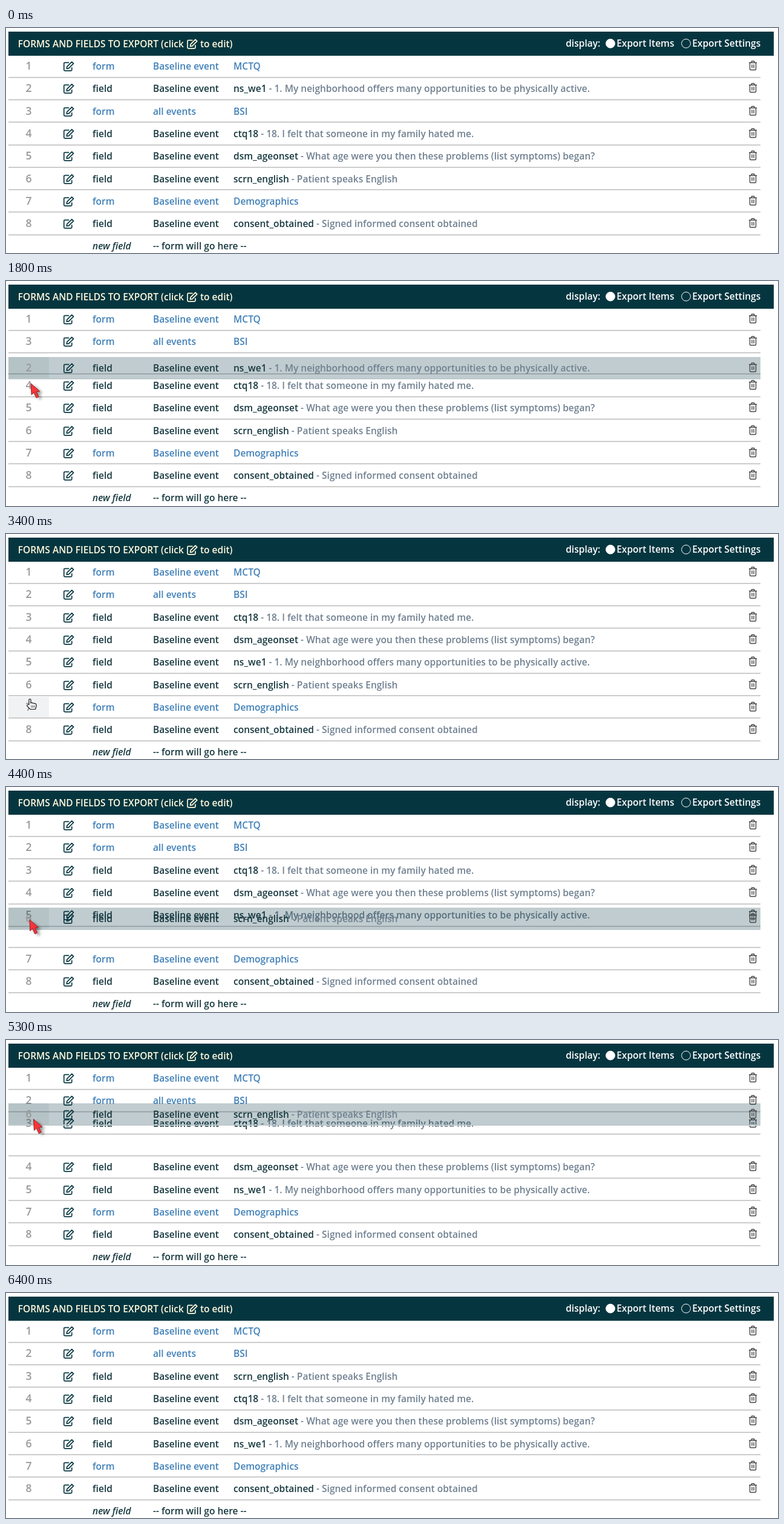
Recreate the animation shown at these times as an HTML page with a canvas. Size 1276 by 373 pixels, loop 7000 ms.

```html
<!DOCTYPE html>
<html lang="en">
<head>
<meta charset="utf-8">
<title>Sorting export rows</title>
<style>
html, body { margin: 0; width: 100%; height: 100%; overflow: hidden; background: #fff; }
canvas { display: block; }
</style>
</head>
<body>
<canvas id="stage" width="1276" height="373"></canvas>
<script>
const ctx = document.getElementById('stage').getContext('2d');
const LOOP = 7000, STEP = 100, TOP = 63, PITCH = 37.3;
const DARK = '#17383f', BLUE = '#4080b8', SLATE = '#708090', CREAM = '#fff8dc';
const FONT = '600 15.5px "Open Sans", sans-serif';
const NUM_FONT = '600 17.6px "Open Sans", sans-serif';

// [event, name, description]; rows without a description are forms
const ROWS = [
  ['Baseline event', 'MCTQ'],
  ['Baseline event', 'ns_we1', '1. My neighborhood offers many opportunities to be physically active.'],
  ['all events', 'BSI'],
  ['Baseline event', 'ctq18', '18. I felt that someone in my family hated me.'],
  ['Baseline event', 'dsm_ageonset', 'What age were you then these problems (list symptoms) began?'],
  ['Baseline event', 'scrn_english', 'Patient speaks English'],
  ['Baseline event', 'Demographics'],
  ['Baseline event', 'consent_obtained', 'Signed informed consent obtained']
];

// path: [time, row centre]; lag: how many slots the gap trails the row
const DRAGS = [
  { start: 1400, end: 2800, from: 1, to: 4, lag: 0, path: [[1500, 108], [2250, 211]] },
  { start: 4100, end: 6000, from: 5, to: 2, lag: 1, path: [[4100, 245], [4900, 161], [5600, 98]] }
];

// [time, x, y]
const POINTER = [
  [400, 138, 352], [1000, 46, 104], [1300, 46, 104], [2250, 37, 226], [3400, 39, 274],
  [3700, 38, 263], [4000, 38, 263], [4900, 40, 159], [5600, 49, 113], [5900, 49, 113], [6400, 138, 352]
];

const ARROW = new Path2D('M0 0L1 19L5 15L9 24L13 22L9 14L14.5 13Z');
const HAND = new Path2D('M4 10V2Q4 .5 5.5 .5Q7 .5 7 2V7Q9 6 10 7.5Q12 6.8 13 8.2Q16 8 16 10V13L14.5 17.5H6L1 12.5Q0 10.5 2 10Z');
const FIST = new Path2D('M3 9Q4 6 7 7Q9 6 10 7.5Q12 6.8 13 8.2Q16 8 16 10V13L14.5 17.5H6L2 13Z');
const EDIT = new Path2D('M1-6H-6Q-7.5-6-7.5-4.5V6Q-7.5 7.5-6 7.5H4Q5.5 7.5 5.5 6V2M-2.5 .8L5.5-7.2L8.3-4.4L.3 3.6L-3 4.1Z');
const BIN = new Path2D('M-6.5-5H6.5M-3-5L-2-7.5H2L3-5M-5-5V5.5Q-5 7-3.5 7H3.5Q5 7 5 5.5V-5M-1.5-2V4M1.5-2V4');

// eased position between key points
function glide(keys, t) {
  const next = keys.findIndex(k => k[0] > t);
  if (next < 1) return keys.at(next).slice(1);
  const a = keys[next - 1], b = keys[next];
  const f = (t - a[0]) / (b[0] - a[0]), ease = f * f * (3 - 2 * f);
  return a.slice(1).map((v, n) => v + (b[n + 1] - v) * ease);
}

function text(s, x, y, color, font = FONT) {
  ctx.font = font;
  ctx.fillStyle = color;
  ctx.fillText(s, x, y);
  return x + ctx.measureText(s).width;
}

function box(x, y, w, h, color) {
  ctx.fillStyle = color;
  ctx.fillRect(x, y, w, h);
}

function icon(path, x, y, color, width) {
  ctx.save();
  ctx.translate(x, y);
  ctx.strokeStyle = color;
  ctx.lineWidth = width;
  ctx.lineJoin = 'round';
  ctx.stroke(path);
  ctx.restore();
}

function radio(x, filled) {
  ctx.beginPath();
  ctx.arc(x, 25.7, 7.4, 0, 7);
  ctx.fillStyle = ctx.strokeStyle = '#fff';
  ctx.lineWidth = 1;
  ctx.stroke();
  if (filled) ctx.fill();
}

function header() {
  box(4, 6, 1265, 40, '#053640');
  text('FORMS AND FIELDS TO EXPORT (click', 19.7, 32, CREAM);
  icon(EDIT, 307.5, 26.3, CREAM, 1.7);
  text('to edit)', 321, 32, CREAM);
  text('display:', 925.2, 31, '#fff');
  radio(999, true);
  text('Export Items', 1009.2, 31, '#fff');
  radio(1124, false);
  text('Export Settings', 1134.2, 31, '#fff');
}

function row(id, number, y) {
  const [event, name, note] = ROWS[id];
  const color = note ? DARK : BLUE, base = y + 6;
  ctx.textAlign = 'center';
  text(number, 37.5, base, '#999', NUM_FONT);
  ctx.textAlign = 'left';
  icon(EDIT, 103.3, y + .3, '#0b3a44', 1.7);
  text(note ? 'field' : 'form', 143, base, color);
  text(event, 243, base, color);
  const end = text(name, 376, base, color);
  if (note) text(' - ' + note, end, base, SLATE);
  icon(BIN, 1234.5, y - .5, '#444', 1.4);
}

function arrow(x, y) {
  ctx.translate(x, y);
  ctx.shadowColor = 'rgba(0,0,0,.4)';
  ctx.shadowBlur = 4;
  ctx.shadowOffsetX = 5;
  ctx.shadowOffsetY = 3;
  ctx.fillStyle = '#f8343a';
  ctx.fill(ARROW);
  ctx.shadowColor = 'transparent';
  ctx.strokeStyle = '#8c2428';
  ctx.lineWidth = 1;
  ctx.stroke(ARROW);
}

function hand(x, y, shape) {
  ctx.translate(x - 5, y - 1);
  ctx.fillStyle = '#fff';
  ctx.fill(shape);
  ctx.strokeStyle = '#111';
  ctx.lineWidth = 1.2;
  ctx.stroke(shape);
  ctx.beginPath();
  for (let x = 8; x <= 13; x += 2.5) {
    ctx.moveTo(x, 11);
    ctx.lineTo(x, 15);
  }
  ctx.lineWidth = .8;
  ctx.stroke();
}

function pointer(t, x, y, drag) {
  // the hand closes 200 ms before each drag
  const pressed = DRAGS.some(d => t >= d.start - 200 && t < d.start);
  ctx.save();
  if (drag || x > 62) arrow(x, y);
  else hand(x, y, pressed ? FIST : HAND);
  ctx.restore();
}

function draw(t) {
  box(0, 0, 1276, 373, '#fff');
  header();

  const order = ROWS.map((_, i) => i);
  const move = (list, from, to) => list.splice(to, 0, list.splice(from, 1)[0]);
  const [first] = DRAGS;
  const drag = DRAGS.find(d => t >= d.start && t < d.end);
  for (const d of DRAGS) if (t >= d.end) move(order, d.from, d.to);

  const shown = order.slice();
  let gap = ROWS.length, y;
  if (drag) {
    y = Math.round(glide(drag.path, t)[0]);
    gap = Math.round((y - TOP) / PITCH + drag.lag);
    if (drag.lag) gap = Math.min(gap, drag.from);
    move(shown, drag.from, gap);
  }

  // the number cell under the hand is tinted after a drop
  const [px, py] = glide(POINTER, t), visible = t >= 400 && t < 6400;
  if (visible && !drag && t >= first.end && px < 62) {
    const i = Math.floor((py - 45.5) / PITCH);
    box(4, Math.round(46 + PITCH * i), 67, 35, '#f1f2f3');
  }

  // the gap is 2 px lower than a row, so what follows moves up
  shown.forEach((id, i) => {
    if (i !== gap) row(id, order.indexOf(id) + 1, Math.round(TOP + PITCH * i) - (i > gap ? 2 : 0));
    box(4, Math.round(80.6 + PITCH * i) - (i >= gap ? 2 : 0), 1243, 2, '#ccc');
  });
  const last = drag ? 365 : 367;
  text('new field', 143, last, DARK, 'italic ' + FONT);
  text('-- form will go here --', 243, last, DARK);

  if (drag) {
    box(4, y - 18, 1243, 35, 'rgba(5,54,64,.25)');
    box(4, y - 18, 67, 35, 'rgba(5,54,64,.06)');
    box(4, y + 17, 1243, 2, '#bdc9cc');
    row(order[drag.from], drag.from + 1, y);
  }
  if (visible) pointer(t, px, py, drag);
}

function frame(now) {
  draw(Math.floor((now % LOOP) / STEP) * STEP);
  requestAnimationFrame(frame);
}
requestAnimationFrame(frame);
</script>
</body>
</html>
```
